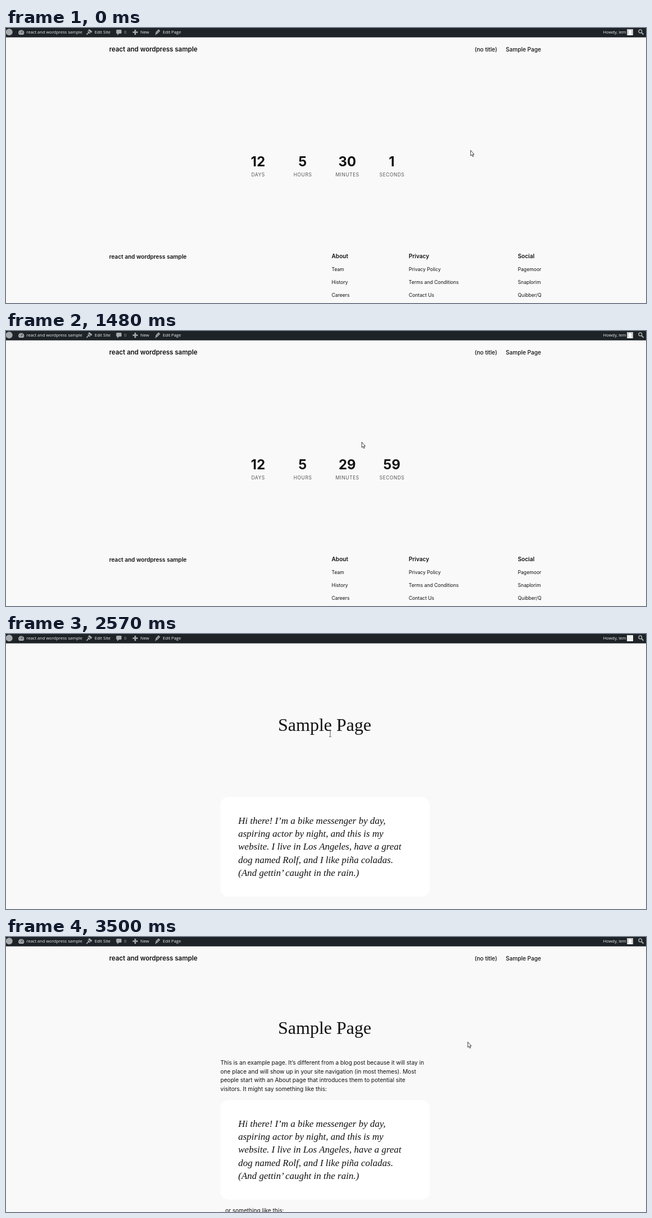
Recreate the animation shown at these times as an HTML page. Size 1141 px wide and 491 px high, loop 3810 ms.

```html
<!DOCTYPE html>
<html lang="en">
<head>
<meta charset="utf-8">
<title>Countdown page</title>
<style>
  html, body { margin: 0; width: 100%; height: 100%; overflow: hidden; background: #f9f9f9; }
  svg { display: block; }
  text { font: 400 10.1px Inter, sans-serif; fill: #111; white-space: pre; }
  .bar text { font: 7.55px "Open Sans", sans-serif; fill: #f0f0f1; }
  .bar .icon, .bar text.dim { fill: #a7aaad; }
  .line { fill: none; stroke: #a7aaad; stroke-width: 1.5; }
  .brand { font-size: 11.5px; font-weight: 600; }
  .menu { font-weight: 500; }
  .bold { font-weight: 600; }
  .small { font-size: 8.65px; }
  .number { font-size: 24px; font-weight: 700; text-anchor: middle; }
  .label { font-size: 8.4px; letter-spacing: .6px; fill: #555; text-anchor: middle; }
  .title { font: 32px "Liberation Serif", serif; }
  .quote { font: italic 17px "Liberation Serif", serif; }
  .pointer { fill: #fff; stroke: #111; stroke-width: .8; stroke-linejoin: round; }
</style>
</head>
<body>
<svg width="1141" height="491" viewBox="0 0 1141 491">
  <rect width="1141" height="491" fill="#f9f9f9"/>

  <g class="bar">
    <rect width="1141" height="16.7" fill="#1d2327"/>
    <circle class="icon" cx="5.7" cy="7.2" r="6"/>
    <path class="icon" d="M23.5 12A5.2 5.2 0 1 1 30.9 12Z"/>
    <path d="M27.2 9.5L29.3 5M24 8.5h1M25 5.5l.8.6M27.2 3.4v1M29.5 8.5h1" stroke="#1d2327" fill="none"/>
    <path class="icon" d="M148.5 2L153.8 6.6L151.6 8.8L146.3 4.2ZM145.6 5L150.8 9.5L148.4 10L147.2 9.2L144.4 12.4L143 11L146.2 8.2Z"/>
    <path class="icon" d="M198 3h6.500q1.500 0 1.500 1.500v4q0 1.500-1.500 1.500h-3l-3 3v-3h-.5q-1.500 0-1.500-1.500v-4q0-1.500 1.500-1.500Z"/>
    <path class="icon" d="M229 3h2.600v3.200h3.400v2.600h-3.400v3.400h-2.600v-3.400h-3.200v-2.600h3.200Z"/>
    <path class="icon" d="M272 2.200L275 5.200L269.600 10.600L266.300 11.800L267 7.600ZM265.800 12.500l1.800-.2-1.500-1.300Z"/>
    <path d="M268.300 9.200L272.800 4.700" stroke="#1d2327" stroke-width=".7"/>
    <circle class="line" cx="1130.800" cy="5.900" r="2.800"/>
    <path class="line" d="M1132.800 8L1136.500 11.800" style="stroke-width:2"/>
    <text x="36.500" y="10.300">react and wordpress sample</text>
    <text x="158" y="10.300">Edit Site</text>
    <text x="210.500" y="10.300" class="dim">0</text>
    <text x="239.500" y="10.300">New</text>
    <text x="279.500" y="10.300">Edit Page</text>
    <text x="1064.500" y="10.300">Howdy, lem</text>
    <rect x="1107" y="2" width="11" height="11" fill="#f0f0f1"/>
    <path id="avatar" d="M1107 2h11v11h-11Z" fill="#ccc"/>
    <path id="portrait" d="M1108.500 13q0-3 2.500-3.500a2.800 3.200 0 1 1 3 0q2.500.5 2.500 3.500Z" fill="#fff"/>
  </g>

  <g id="header">
    <text x="184" y="41.500" class="brand">react and wordpress sample</text>
    <text x="835.500" y="41.500" class="menu">(no title)</text>
    <text x="891" y="41.500" class="menu">Sample Page</text>
  </g>

  <g id="home">
    <g id="counter"></g>
    <text x="184" y="412" class="bold">react and wordpress sample</text>
    <g id="footer"></g>
  </g>

  <g id="sample">
    <text x="485" y="173" class="title">Sample Page</text>
    <rect x="382" y="291" width="373.500" height="178" rx="15" fill="#fff"/>
    <g id="quote"></g>
    <g id="body"></g>
  </g>

  <g id="cursor">
    <path id="arrow" class="pointer" d="M.3.4V10L2.400 8.200L3.900 11.500L5.400 10.900L4 7.600H6.700Z"/>
    <g id="hand" class="pointer">
      <path d="M-1.200 8V1.500a1.100 1.100 0 0 1 2.200 0V5.400q1-.8 1.700.3q1-.6 1.600.4q1.500-.2 1.500 1.200V10L4.600 13.600H-.6L-3.600 9.300q-.8-1.600.6-1.900Z"/>
      <path d="M1 5.400V7.400M2.700 5.700V7.600M4.300 6.100V7.800"/>
    </g>
    <path id="beam" d="M-2-5.500H-.6L0-5L.6-5.500H2M0-5V5M-2 5.500H-.6L0 5L.6 5.500H2" fill="none" stroke="#333" stroke-width=".8"/>
  </g>
</svg>
<script>
const LOOP = 3810;
const $ = id => document.getElementById(id);

function addText(parent, x, y, className, content) {
  const node = document.createElementNS("http://www.w3.org/2000/svg", "text");
  node.setAttribute("x", x);
  node.setAttribute("y", y);
  node.setAttribute("class", className);
  node.textContent = content;
  $(parent).append(node);
  return node;
}

const [days, hours, minutes, seconds] = ["DAYS", "HOURS", "MINUTES", "SECONDS"].map((label, i) => {
  const x = 449.3 + 79.5 * i;
  addText("counter", x + .3, 264.7, "label", label);
  return addText("counter", x, 246.8, "number", "");
});
days.textContent = 12;
hours.textContent = 5;

[
  [580.5, "About", "Team", "History", "Careers"],
  [718, "Privacy", "Privacy Policy", "Terms and Conditions", "Contact Us"],
  [912.5, "Social", "Pagemoor", "Snaplorim", "Quibber/Q"],
].forEach(([x, heading, ...links]) => {
  addText("footer", x, 410.5, "bold", heading);
  links.forEach((link, i) => addText("footer", x, 434 + 23.2 * i, "small", link));
});

[
  "Hi there! I’m a bike messenger by day,",
  "aspiring actor by night, and this is my",
  "website. I live in Los Angeles, have a great",
  "dog named Rolf, and I like piña coladas.",
  "(And gettin’ caught in the rain.)",
].forEach((line, i) => addText("quote", 414, 339 + 23.2 * i, "quote", line));

[
  "This is an example page. It’s different from a blog post because it will stay in",
  "one place and will show up in your site navigation (in most themes). Most",
  "people start with an About page that introduces them to potential site",
  "visitors. It might say something like this:",
].forEach((line, i) => addText("body", 382.3, 227.7 + 15.8 * i, "", line));
addText("body", 382.3, 491.8, "", "…or something like this:");

// The pointer advances in discrete steps: the first at start, the last at end.
const smooth = p => p * p * (3 - 2 * p);
const moves = [
  { start: 1160, end: 1640, steps: 7, to: [586, 193], ease: smooth },
  { start: 1700, end: 1930, steps: 4, to: [577, 177], ease: p => p ** 1.7 },
  { start: 2090, end: 2190, steps: 2, to: [572, 168], ease: p => p },
  { start: 2280, end: 2280, steps: 1, to: [578, 177], ease: p => p },
  { start: 2570, end: 2570, steps: 1, to: [578, 178], ease: p => p },
  { start: 3020, end: 3500, steps: 7, to: [823, 187], ease: smooth },
];

function pointerAt(t) {
  let point = [828, 218];
  for (const { start, end, steps, to, ease } of moves) {
    if (t < start) break;
    const step = t >= end ? steps : 1 + Math.floor((t - start) / (end - start) * (steps - 1));
    const p = ease(step / steps);
    point = point.map((v, i) => v + (to[i] - v) * p);
  }
  return point.map(Math.round);
}

function show(id, visible) {
  $(id).style.display = visible ? "" : "none";
}

function render(t) {
  const onSample = t >= 2570;
  const loaded = !onSample || t >= 2710;
  show("home", !onSample);
  show("sample", onSample);
  for (const id of ["header", "body", "avatar", "portrait"]) show(id, loaded);

  const left = 1801 - [230, 1250, 2190].filter(tick => t >= tick).length;
  minutes.textContent = Math.floor(left / 60);
  seconds.textContent = left % 60;

  const [x, y] = pointerAt(t);
  const shape = onSample ? (x < 655 ? "beam" : "arrow") : (x < 610 ? "hand" : "arrow");
  for (const id of ["arrow", "hand", "beam"]) show(id, id === shape);
  $("cursor").setAttribute("transform", `translate(${x} ${y})`);
}

function frame() {
  render(performance.now() % LOOP);
  requestAnimationFrame(frame);
}
frame();
</script>
</body>
</html>
```
